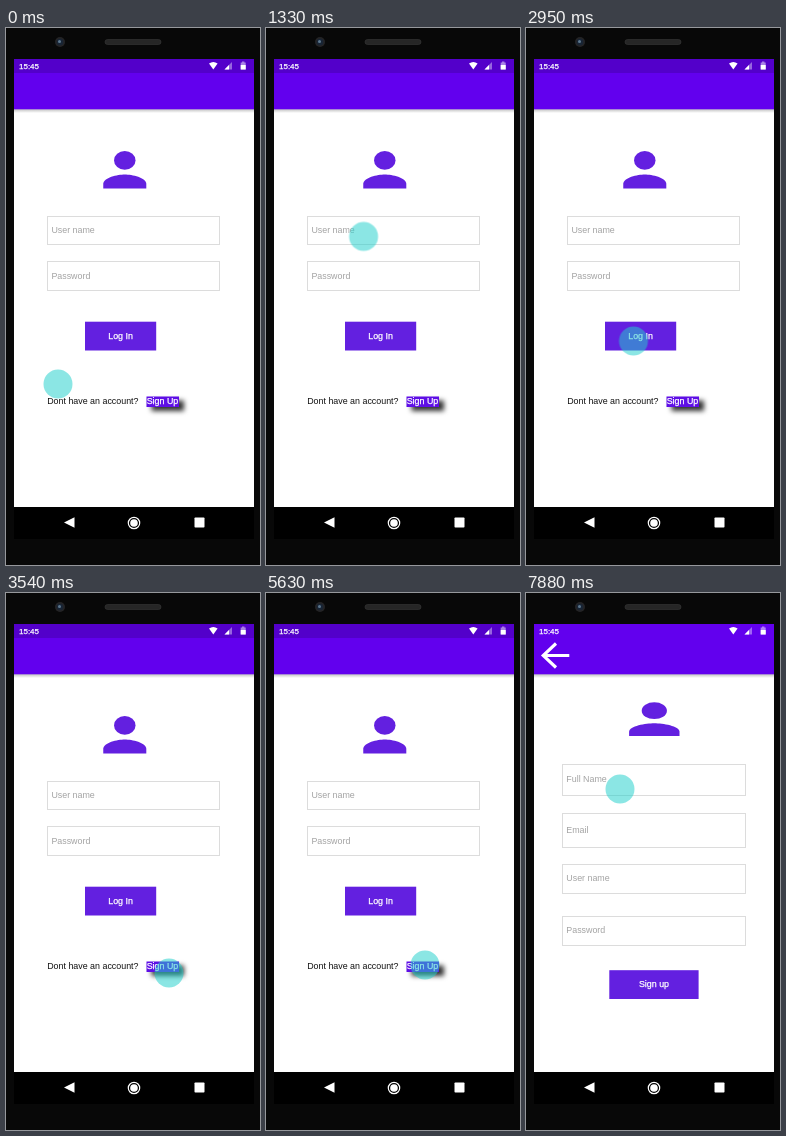
Write an HTML page that moves like this. It is 254 px wide and 537 px high and loops after 8 s.

```html
<!DOCTYPE html>
<html lang="en">
<head>
<meta charset="utf-8">
<title>Sign up flow</title>
<style>
  html, body { margin: 0; width: 100%; height: 100%; overflow: hidden; background: #080808; }
  svg { display: block; width: 100%; height: 100%; }
  text { font: 8.9px "Liberation Sans", Arial, sans-serif; fill: #fff; stroke: #fff; stroke-width: .25; }
  .clock { font-size: 8px; }
  .hint { fill: #a3a3a3; stroke: none; }
  .dark { fill: #111; stroke: none; }
  .mid { text-anchor: middle; }
  .field { fill: #fff; stroke: #dcdcdc; }
  .accent { fill: #6320e0; }
  .link { fill: #5e0ee6; filter: drop-shadow(5px 4px 2.8px rgba(0, 0, 0, .8)); }
  .white { fill: #fff; }

  .login { animation: leave 8s step-end infinite; }
  .signup { animation: enter 8s step-end infinite; }
  @keyframes leave { 0% { visibility: visible; } 81.6%, 100% { visibility: hidden; } }
  @keyframes enter { 0% { visibility: hidden; } 81.6%, 100% { visibility: visible; } }

  /* The finger hops about every 148 ms on its way from stop to stop */
  #touch {
    fill: rgb(32, 207, 203);
    fill-opacity: .52;
    animation: wander 8s infinite;
  }
  @keyframes wander {
    0%, 1.875% { transform: translate(52px, 356px); animation-timing-function: steps(2); }
    5.6%, 7.4% { transform: translate(52px, 354px); animation-timing-function: steps(3); }
    12.95% { transform: translate(131.5px, 93.5px); animation-timing-function: steps(2); }
    16.6% { transform: translate(97.6px, 208.4px); animation-timing-function: steps(3); }
    22.1% { transform: translate(98.5px, 228px); animation-timing-function: steps(4); }
    29.45%, 31.3% { transform: translate(158px, 321px); animation-timing-function: steps(3); }
    36.85% { transform: translate(107.5px, 313px); animation-timing-function: steps(4); }
    44.2% { transform: translate(163px, 380px); animation-timing-function: steps(2); }
    47.85%, 68.5% { transform: translate(159px, 375.5px); animation-timing-function: steps(1); }
    70.35% { transform: translate(159px, 372px); animation-timing-function: steps(3); }
    75.95%, 91% { transform: translate(154px, 374px); animation-timing-function: steps(4); }
    98.45%, 100% { transform: translate(94px, 196px); }
  }
</style>
</head>
<body>
<svg viewBox="0 0 254 537">
  <defs>
    <linearGradient id="shade" x2="0" y2="1">
      <stop stop-color="#000" stop-opacity=".25"/>
      <stop offset="1" stop-color="#000" stop-opacity="0"/>
    </linearGradient>
    <g id="person" class="accent">
      <circle cx="12" cy="8" r="4"/>
      <path d="M12 14c-2.67 0-8 1.34-8 4v2h16v-2c0-2.66-5.33-4-8-4z"/>
    </g>
  </defs>

  <!-- Phone body -->
  <rect width="254" height="537" fill="#080808"/>
  <circle cx="54" cy="14" r="5" fill="#242426"/>
  <circle cx="54" cy="14" r="3.2" fill="#182434"/>
  <circle cx="53.5" cy="13.5" r="1.5" fill="#5d7890"/>
  <rect x="99" y="11.5" width="56" height="5" rx="2.5" fill="#262626" stroke="#383838" stroke-width=".6"/>

  <!-- Screen and bars -->
  <rect x="8" y="31" width="240" height="448" fill="#fff"/>
  <rect x="8" y="81" width="240" height="4" fill="url(#shade)"/>
  <rect x="8" y="31" width="240" height="50.3" fill="#6200ee"/>
  <rect class="login" x="8" y="31" width="240" height="14" fill="#5300ca"/>
  <text class="clock" x="13" y="41">15:45</text>
  <g class="white">
    <path d="M203 35.6Q207.3 32.6 211.6 35.6L207.3 41.6Z"/>
    <path d="M218.5 41.5L226 34V41.5Z" opacity=".4"/>
    <path d="M218.5 41.5L223 37V41.5Z"/>
    <path d="M234.7 34.4H236V33.4H238.4V34.4H239.7V41.5H234.7Z" opacity=".5"/>
    <rect x="234.7" y="37" width="5" height="4.5"/>
  </g>
  <rect x="8" y="479" width="240" height="32" fill="#000"/>
  <g class="white">
    <path d="M58 494.5L68.5 489.2V499.8Z"/>
    <circle cx="128" cy="495" r="3.8"/>
    <circle cx="128" cy="495" r="5.7" fill="none" stroke="#fff" stroke-width="1.2"/>
    <rect x="188.5" y="489.5" width="10" height="10" rx=".8"/>
  </g>

  <g class="login">
    <use href="#person" transform="translate(86.5 113.7) scale(2.69 2.34)"/>
    <rect class="field" x="41.5" y="188.5" width="172" height="28"/>
    <rect class="field" x="41.5" y="233.5" width="172" height="29"/>
    <text class="hint" x="45.4" y="204.8">User name</text>
    <text class="hint" x="45.4" y="250.8">Password</text>
    <rect class="accent" x="79" y="293.7" width="71.2" height="28.8"/>
    <text class="mid" x="114.6" y="310.8">Log In</text>
    <text class="dark" x="41.2" y="376.1">Dont have an account?</text>
    <rect class="link" x="140.5" y="368.5" width="32.5" height="10.5"/>
    <text x="140.7" y="376.1">Sign Up</text>
  </g>

  <g class="signup">
    <path d="M43.3 62.5H17.2M30 50.5L17.2 62.5L30 74.5" fill="none" stroke="#fff" stroke-width="3.1"/>
    <use href="#person" transform="translate(90.5 100.9) scale(3.15 2.1)"/>
    <rect class="field" x="36.5" y="171.5" width="183" height="31"/>
    <rect class="field" x="36.5" y="220.5" width="183" height="34"/>
    <rect class="field" x="36.5" y="271.5" width="183" height="29"/>
    <rect class="field" x="36.5" y="323.5" width="183" height="29"/>
    <text class="hint" x="40.3" y="189.2">Full Name</text>
    <text class="hint" x="40.3" y="239.8">Email</text>
    <text class="hint" x="40.3" y="288.3">User name</text>
    <text class="hint" x="40.3" y="340.3">Password</text>
    <rect class="accent" x="83.3" y="377.2" width="89.3" height="28.8"/>
    <text class="mid" x="128" y="394.2">Sign up</text>
  </g>

  <circle id="touch" r="14.5"/>
</svg>
</body>
</html>
```
